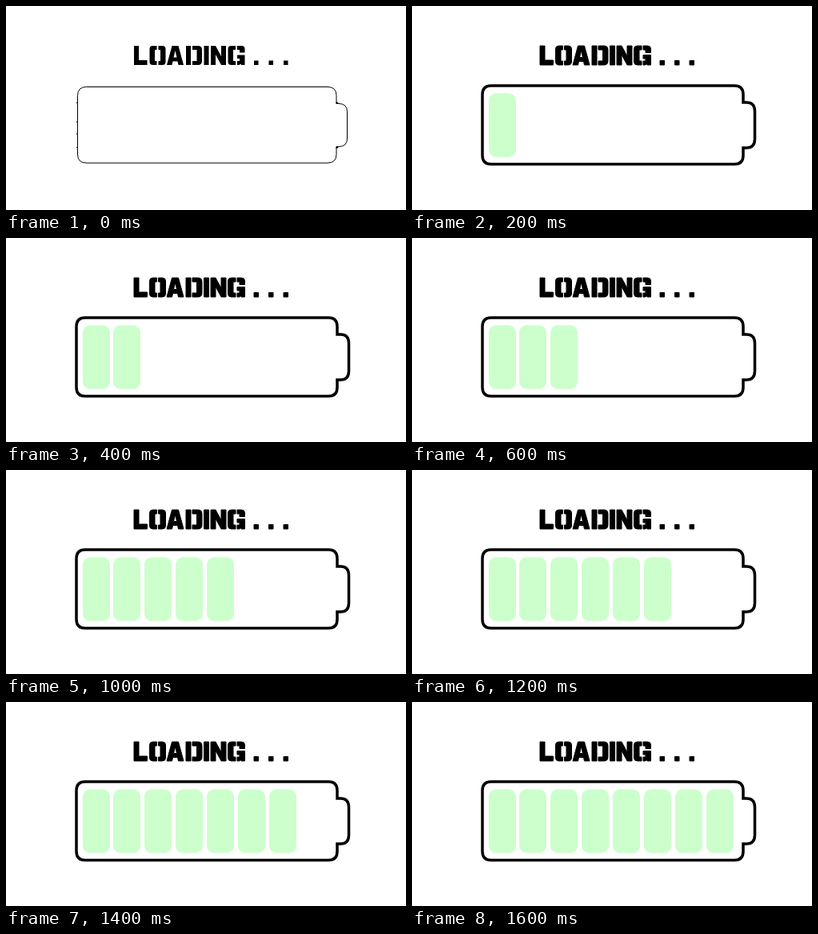
Animation of 500x256 px, one loop 1.8 s. Source, as an HTML page:

```html
<!DOCTYPE html>
<html lang="en">
<head>
<meta charset="utf-8">
<title>Loading</title>
<style>
  html, body { margin: 0; width: 100%; height: 100%; overflow: hidden; background: #fff; }
  svg { display: block; }
  .shell { fill: none; stroke: #000; }
  #thin .shell { stroke-width: 1; }
  #bold .shell { stroke-width: 3.5; }
  #bars { fill: #cfc; }
  #lettering.heavy { stroke: #000; stroke-width: 1; }
</style>
</head>
<body>
<svg width="500" height="256" viewBox="0 0 500 256" role="img" aria-label="LOADING . . .">
  <g id="lettering">
    <!-- L O A D I N G in stencil capitals -->
    <path d="M160 50h6v18h10.500v6H160z"/>
    <path d="M188.500 50h-5q-4 0-4 4v16q0 4 4 4h5v-5h-2.500V55h2.500zM190.500 50h5q4 0 4 4v16q0 4-4 4h-5v-5h2.500V55h-2.500z"/>
    <path fill-rule="evenodd" d="M201 74l6.500-24h8l6.500 24h-6.500l-1-4.500h-6l-1 4.500zM211.500 56l-2 8.500h4z"/>
    <path d="M225 50h6v24h-6zM233 50h7q5 0 5 5v14q0 5-5 5h-7v-5h5.500V55H233z"/>
    <path d="M247.500 50h6v24h-6z"/>
    <path d="M256 50h6l7 13V50h6v24h-6l-7-13v13h-6z"/>
    <path d="M287 50h-5.500q-4 0-4 4v16q0 4 4 4h5.500v-5h-3V55h3zM289 50h5.500q4 0 4 4v4.500H292V55h-3zM289 61.500h9.500V74H294l-.5-1.500-2 1.500H289v-5h3v-3h-3z"/>
    <path d="M310 68.500h5.500v5.500H310zM328.500 68.500h5.500v5.500h-5.500zM347 68.500h5.500v5.500H347z"/>
  </g>
  <g id="thin">
    <path class="shell" d="M100.500 101.500H402q11 0 11 11V122.500h3q10.500 0 10.500 10.500v33q0 10.500-10.500 10.500h-3V186q0 11-11 11H100.500q-11 0-11-11V112.500q0-11 11-11z"/>
    <path d="M412.500 120.500h2l1.500 2h-3.500zM412.500 178.500h2l1.500-2h-3.500zM88 121h1v1h-1zM88 145h1v1h-1zM88 160h1v1h-1zM88 177h1v1h-1z"/>
  </g>
  <g id="bold">
    <path class="shell" d="M99 100H403q11 0 11 11V121h4q10.500 0 10.500 11v35q0 11-10.500 11h-4V187.500q0 11-11 11H99q-11 0-11-11V111q0-11 11-11z"/>
  </g>
  <g id="bars"></g>
</svg>
<script>
  const STEP = 200, BARS = 8;
  const byId = id => document.getElementById(id);
  const show = (el, on) => el.setAttribute('visibility', on ? 'visible' : 'hidden');

  const bars = Array.from({ length: BARS }, (_, i) => {
    const bar = document.createElementNS('http://www.w3.org/2000/svg', 'rect');
    const box = { x: 96 + Math.floor(38.9 * i), y: 109.5, width: 34, height: 80, rx: 9 };
    for (const key in box) bar.setAttribute(key, box[key]);
    return byId('bars').appendChild(bar);
  });

  function draw() {
    const filled = Math.floor(performance.now() / STEP) % (BARS + 1);
    const charging = filled > 0;
    show(byId('thin'), !charging);
    show(byId('bold'), charging);
    byId('lettering').classList.toggle('heavy', charging);
    bars.forEach((bar, i) => show(bar, i < filled));
    requestAnimationFrame(draw);
  }
  draw();
</script>
</body>
</html>
```
